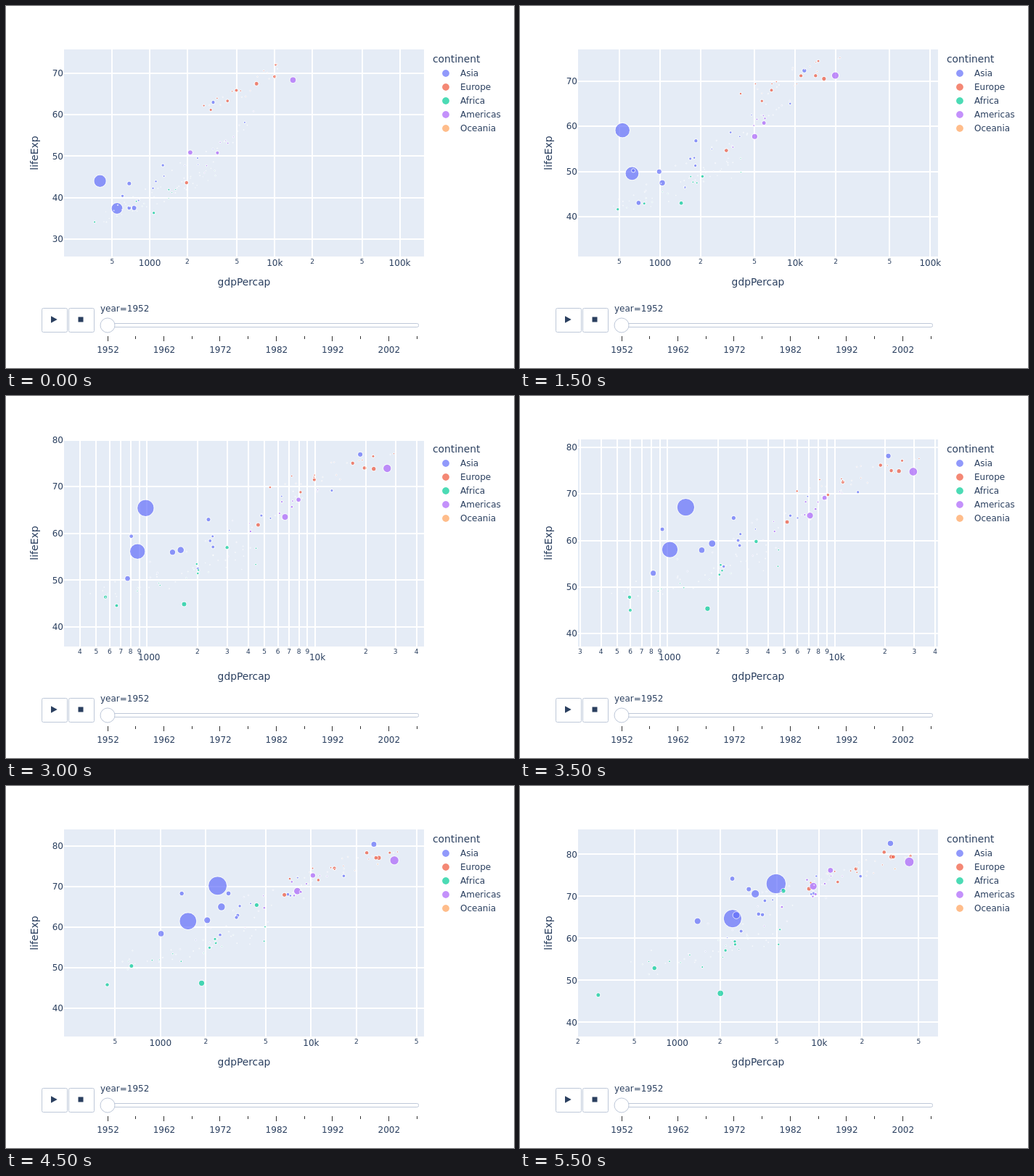
An HTML page with a canvas that plays this animation: 700x500 px, repeating every 6 s.

```html
<!DOCTYPE html>
<html lang="en">
<head>
<meta charset="utf-8">
<title>Life expectancy and income</title>
<style>
  html, body { margin: 0; width: 100%; height: 100%; overflow: hidden; background: #fff; }
  canvas { display: block; }
</style>
</head>
<body>
<canvas id="chart" width="700" height="500"></canvas>
<script>
const ctx = document.getElementById('chart').getContext('2d');
const FONT = 'Verdana, "DejaVu Sans", sans-serif';
const INK = '#2a3f5f', BORDER = '#bec8d9';
const STEP = 500, STEPS = 12;
const PLOT = { x: 80, y: 60, w: 496, h: 286 };

// growth: population over the whole span
const ASIA = { name: 'Asia', color: '#636efa', growth: 2.5 };
const EUROPE = { name: 'Europe', color: '#ef553b', growth: 1.25 };
const AFRICA = { name: 'Africa', color: '#00cc96', growth: 4 };
const AMERICAS = { name: 'Americas', color: '#ab63fa', growth: 2.2 };
const OCEANIA = { name: 'Oceania', color: '#ffa15a', growth: 2.2 };
const GROUPS = [ASIA, EUROPE, AFRICA, AMERICAS, OCEANIA];

// Ends of the data per step, which the axes fit
const GDP_MIN = [299, 336, 355, 349, 357, 371, 424, 385, 347, 312, 241, 278];
const GDP_MAX = [108e3, 114e3, 95e3, 81e3, 109e3, 59300, 33700, 31500, 34900, 41300, 44700, 49400];
const LIFE_MIN = [28.8, 30.3, 32, 34, 35.4, 31.2, 38.5, 39.9, 23.6, 36.1, 39.2, 39.6];
const LIFE_MAX = [72.7, 73.5, 73.7, 74.2, 74.7, 76.1, 77.1, 78.7, 79.4, 80.7, 82, 82.6];

let seed = 23;
const rnd = () => (seed = (seed * 16807) % 2147483647) / 2147483647;
const mix = (a, b, t) => a + (b - a) * t;
const mixLog = (a, b, t) => a * (b / a) ** t;

const bubbles = [];

// Final population in millions, then income and life expectancy: from, to, bend
function add(group, pop, gdpA, gdpB, gdpBend, lifeA, lifeB, lifeBend) {
  bubbles.push({ group, pop, gdpA, gdpB, gdpBend, lifeA, lifeB, lifeBend });
}

// Seeded bubbles; the richer ones start higher and end nearer the cap
function scatter(group, count, pops, gdps, lives, gain, cap) {
  for (let i = 0; i < count; i++) {
    const rich = (i + rnd()) / count;
    const gdp = mixLog(...gdps, rich);
    const life = mix(...lives, rich) + 4 * rnd() - 2;
    add(group, mixLog(...pops, rnd() ** 1.5),
      gdp, gdp * gain * mix(0.7, 1.3, rnd()), mix(0.5, 1.1, rnd()),
      life, mix(life, cap, mix(0.5, 0.9, 0.5 * rich + 0.5 * rnd())), mix(0.5, 0.9, rnd()));
  }
}

add(ASIA, 1319, 400, 4959, 1.7, 44, 73, 0.5);
add(ASIA, 1110, 547, 2452, 1.9, 37.4, 64.7, 0.62);
add(ASIA, 224, 750, 3541, 1.2, 37.5, 70.6, 0.92);
add(ASIA, 127, 3217, 31656, 0.44, 63, 82.6, 0.57);
add(ASIA, 169, 685, 2606, 1, 43.4, 65.5, 0.93);
add(ASIA, 150, 684, 1391, 3, 37.5, 64.1, 1.2);
add(ASIA, 91, 1273, 3190, 0.7, 47.8, 71.7, 0.75);
add(ASIA, 85, 605, 2442, 2.6, 40.4, 74.2, 0.95);
scatter(ASIA, 20, [3, 60], [450, 6000], [36, 57], 3.4, 79);

add(EUROPE, 82, 7144, 32170, 0.46, 67.5, 79.4, 1.05);
add(EUROPE, 58, 4932, 28570, 0.6, 65.9, 80.5, 0.78);
add(EUROPE, 61, 9980, 33203, 0.95, 69.2, 79.4, 1.25);
add(EUROPE, 71, 1969, 8458, 0.9, 43.6, 71.8, 0.72);
scatter(EUROPE, 20, [4, 55], [2600, 11000], [60, 71], 3.4, 81);

add(AFRICA, 135, 1077, 2014, 0.6, 36.3, 46.9, 0.35);
add(AFRICA, 80, 1419, 5581, 1, 41.9, 71.3, 1.1);
add(AFRICA, 76, 362, 691, 0.6, 34.1, 52.9, 0.7);
add(AFRICA, 65, 781, 278, 3, 39.1, 46.5, 0.5);
scatter(AFRICA, 42, [1, 42], [420, 3500], [35, 46], 1.45, 64);

add(AMERICAS, 301, 13990, 42952, 0.9, 68.4, 78.2, 0.95);
add(AMERICAS, 190, 2109, 9066, 0.4, 50.9, 72.4, 0.88);
add(AMERICAS, 109, 3478, 11978, 0.66, 50.8, 76.2, 0.72);
scatter(AMERICAS, 20, [2, 40], [1500, 7000], [40, 60], 2.2, 79);

scatter(OCEANIA, 2, [4, 20], [10000, 10600], [69, 70], 3, 82);

function scales(step) {
  const lo = Math.log10(GDP_MIN[step]), decade = 440.5 / (Math.log10(GDP_MAX[step]) - lo);
  const top = step < 6 ? 77.6 : 79.3;
  const unit = (328.7 - top) / (LIFE_MAX[step] - LIFE_MIN[step]);
  return {
    x: gdp => 107.8 + (Math.log10(gdp) - lo) * decade,
    y: life => 328.7 - (life - LIFE_MIN[step]) * unit,
    dense: decade > 225
  };
}

function text(str, x, y, size = 12, align = 'left') {
  ctx.font = `${size}px ${FONT}`;
  ctx.textAlign = align;
  ctx.fillStyle = INK;
  ctx.fillText(str, x, y);
}

function disc(x, y, r, color) {
  ctx.fillStyle = color;
  ctx.beginPath();
  ctx.arc(x, y, r, 0, 7);
  ctx.fill();
}

function bubble(x, y, r, color) {
  ctx.globalAlpha = 0.7;
  if (r > 0.5) {
    disc(x, y, r - 0.5, color);
    ctx.strokeStyle = '#fff';
    ctx.lineWidth = 1;
    ctx.beginPath();
    ctx.arc(x, y, r, 0, 7);
    ctx.stroke();
  } else {
    disc(x, y, r + 0.5, '#fff');
  }
  ctx.globalAlpha = 1;
}

function box(x, y, w, h, r) {
  ctx.beginPath();
  ctx.roundRect(x, y, w, h, r);
  ctx.fillStyle = '#fff';
  ctx.strokeStyle = BORDER;
  ctx.lineWidth = 1;
  ctx.fill();
  ctx.stroke();
}

function line(x, y, w, h) {
  ctx.fillStyle = '#fff';
  ctx.fillRect(Math.round(x), Math.round(y), w, h);
}

function drawAxes(s) {
  const right = PLOT.x + PLOT.w, bottom = PLOT.y + PLOT.h;
  ctx.fillStyle = '#e5ecf6';
  ctx.fillRect(PLOT.x, PLOT.y, PLOT.w, PLOT.h);

  const digits = s.dense ? [1, 2, 3, 4, 5, 6, 7, 8, 9] : [1, 2, 5];
  const shift = s.dense ? 6 : 0;
  for (let base = 100; base <= 1e5; base *= 10) {
    for (const d of digits) {
      const x = s.x(base * d);
      if (x < PLOT.x - 1 || x > right) continue;
      if (x > PLOT.x + 1) line(x - 1, PLOT.y, 2, PLOT.h);
      if (d > 1) text(d, x, 356, 9, 'center');
      else text(base < 1e4 ? base : base / 1000 + 'k', x + shift / 2, 359 + shift, 12, 'center');
    }
  }
  for (let life = 20; life <= 80; life += 10) {
    const y = s.y(life);
    if (y < PLOT.y || y > bottom) continue;
    line(PLOT.x, y - 1, PLOT.w, 2);
    text(life, 79, y + 4.2, 12, 'right');
  }
  text('gdpPercap', 328, 386 + shift, 13.8, 'center');
  ctx.save();
  ctx.translate(44, 203);
  ctx.rotate(-Math.PI / 2);
  text('lifeExp', 0, 0, 14, 'center');
  ctx.restore();
}

function drawBubbles(s, step) {
  const t = step / (STEPS - 1);
  ctx.save();
  ctx.beginPath();
  ctx.rect(PLOT.x, PLOT.y, PLOT.w, PLOT.h);
  ctx.clip();
  for (const b of bubbles) {
    const gdp = mixLog(b.gdpA, b.gdpB, t ** b.gdpBend);
    const life = mix(b.lifeA, b.lifeB, t ** b.lifeBend);
    const pop = b.pop * mix(1 / b.group.growth, 1, t);
    bubble(s.x(gdp), s.y(life), 0.38 * Math.sqrt(pop), b.group.color);
  }
  ctx.restore();
}

function drawLegend() {
  text('continent', 588, 78, 13.8);
  GROUPS.forEach((group, i) => {
    const y = 93 + 19 * i;
    bubble(606, y, 5.5, group.color);
    text(group.name, 626, y + 4.3);
  });
}

function drawControls() {
  box(49.5, 417.5, 35, 33, 2);
  box(86.5, 417.5, 35, 33, 2);
  ctx.fillStyle = INK;
  ctx.beginPath();
  ctx.moveTo(62, 428.3);
  ctx.lineTo(70.7, 433);
  ctx.lineTo(62, 437.7);
  ctx.fill();
  ctx.fillRect(99.5, 429.5, 7, 7);

  text('year=1952', 130, 422);
  box(130.5, 438.5, 438, 5, 2);
  ctx.beginPath();
  ctx.arc(140, 441, 10, 0, 7);
  ctx.fill();
  ctx.stroke();
  for (let i = 0; i < STEPS; i++) {
    const x = 140 + 38.73 * i, major = i % 2 === 0;
    ctx.fillStyle = '#333';
    ctx.fillRect(Math.floor(x), 456, 1, major ? 7 : 4);
    if (major) text(1952 + 5 * i, x + 0.5, 479, 12, 'center');
  }
}

function draw(step) {
  const s = scales(step);
  ctx.fillStyle = '#fff';
  ctx.fillRect(0, 0, 700, 500);
  drawAxes(s);
  drawBubbles(s, step);
  drawLegend();
  drawControls();
}

const start = performance.now();
let shown = -1;
function tick() {
  const step = Math.floor((performance.now() - start) / STEP) % STEPS;
  if (step !== shown) draw(shown = step);
  requestAnimationFrame(tick);
}
tick();
</script>
</body>
</html>
```
